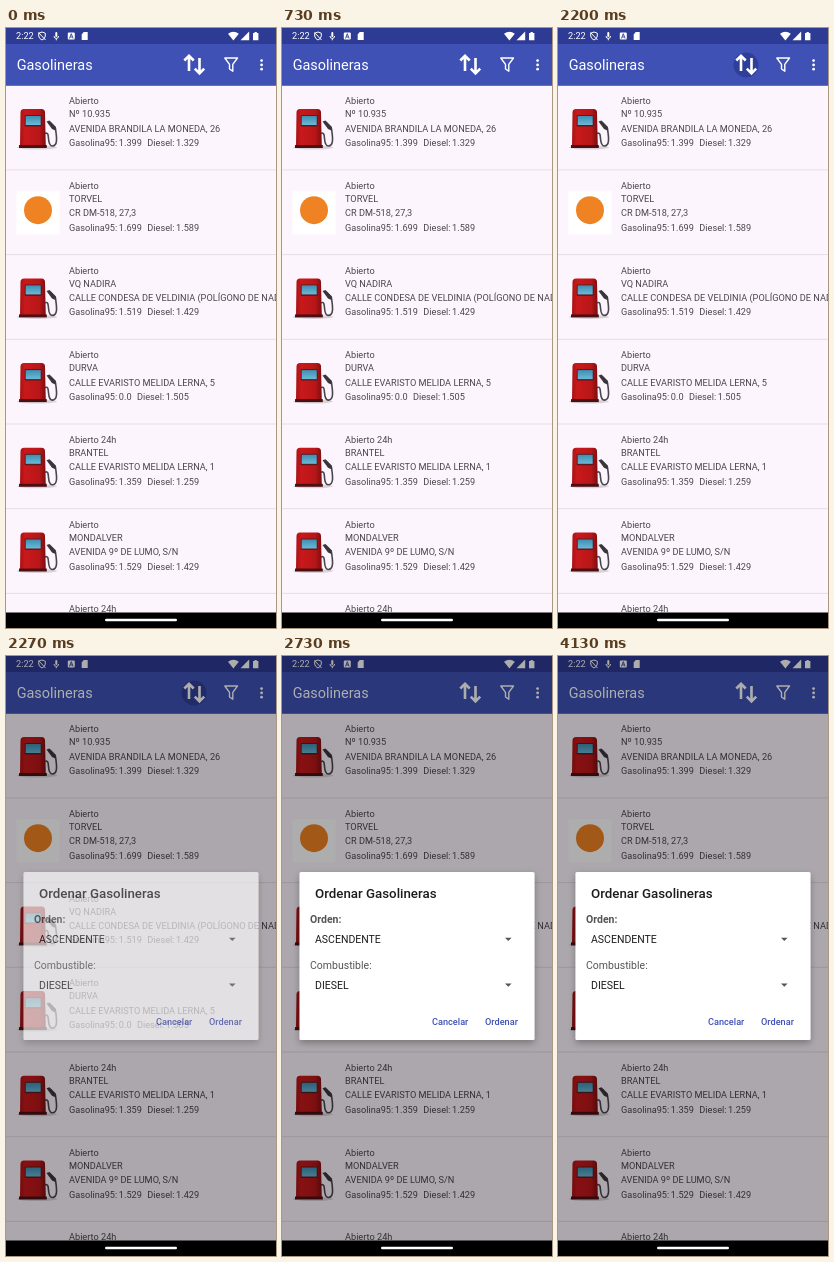
Recreate the animation shown at these times as an HTML page. Size 270 by 600 pixels, loop 4.19 s.

```html
<!DOCTYPE html>
<html lang="es">
<head>
<meta charset="utf-8">
<style>
html, body { margin: 0; width: 100%; height: 100%; overflow: hidden; background: #fdf5fd; }
svg { display: block; width: 100vw; height: 100vh; font: 9.19px Roboto, sans-serif; }
.row text { fill: #4a464b; }
.medium { font-weight: 500; }
.field { font-size: 10.5px; fill: #1d1b1e; }
.label { font-size: 10.5px; fill: #555; }
</style>
</head>
<body>
<svg viewBox="0 0 270 600">
  <defs>
    <linearGradient id="red">
      <stop offset="0" stop-color="#a81214"/>
      <stop offset=".2" stop-color="#c8191b"/>
      <stop offset=".75" stop-color="#b81618"/>
      <stop offset="1" stop-color="#7c0d10"/>
    </linearGradient>
    <linearGradient id="glass" x2="0" y2="1">
      <stop offset="0" stop-color="#3f8fb4"/>
      <stop offset="1" stop-color="#69b9d6"/>
    </linearGradient>
    <filter id="shadow" x="-10%" y="-10%" width="120%" height="125%">
      <feDropShadow dx="0" dy="3" stdDeviation="3.5" flood-opacity=".3"/>
    </filter>
    <g id="pump">
      <ellipse cx="31" cy="62" rx="20" ry="2" fill="#000" opacity=".14"/>
      <path d="M39 48C45 45 40 60 46 60.5C53 61 50 48 49.5 43L44 37" fill="none" stroke="#4a474c" stroke-width="1.6"/>
      <path d="M40.5 36L43.5 35L50 41.5L49.3 45L46 43.5Z" fill="#39363a"/>
      <path d="M14 60.5L14.5 27Q14.5 23.5 18 23.5H35.5Q39 23.5 39 27L39.8 60.5Z" fill="url(#red)"/>
      <rect x="18.7" y="29.5" width="17" height="11.5" rx="1" fill="#5c1a20"/>
      <rect x="19.7" y="30.5" width="15" height="9" fill="url(#glass)"/>
      <path d="M13 59.5H40.8V62.5H13Z" fill="#4b1014"/>
    </g>
  </defs>

  <rect width="270" height="600" fill="#fdf5fd"/>
  <g id="list"></g>

  <rect width="270" height="57.8" fill="#3f51b5"/>
  <rect width="270" height="16" fill="#2d3b95"/>
  <g fill="#fff">
    <text x="10" y="11.3">2:22</text>
    <g fill="none" stroke="#fff" stroke-width="1">
      <path d="M36 4L39.3 5.2V8Q39 10.7 36 12Q33 10.7 32.7 8V5.2ZM32.5 4.5L39.5 12"/>
      <path d="M48 8Q48 10.4 50.3 10.4T52.6 8M50.3 10.4V12.3"/>
    </g>
    <rect x="49.3" y="4" width="2" height="5" rx="1"/>
    <rect x="61.8" y="4.5" width="7" height="7" rx="1"/>
    <path d="M63.5 10.5L65.3 5.7L67.1 10.5M64.3 9H66.3" fill="none" stroke="#2d3b95" stroke-width=".9"/>
    <path d="M75.7 6.5L77.7 4H81.7V12H75.7Z"/>
    <path d="M222 5.8Q227.4 1.8 232.8 5.8L227.4 12.5Z"/>
    <path d="M234.5 12.3L243.2 3.6V12.3Z"/>
    <path d="M247 5H248.6V4H250.8V5H252.4V12.3H247Z"/>
    <text x="10.7" y="42.4" font-size="14.44">Gasolineras</text>
  </g>
  <circle id="ripple" cx="188" cy="37" r="12.5" fill="#101a58"/>
  <g fill="none" stroke="#fff" stroke-width="2.6">
    <path d="M183 43V28M178.3 32.5L183 27.8L187.7 32.5"/>
    <path d="M193.5 30V45M188.8 40.7L193.5 45.4L198.2 40.7"/>
    <path d="M218.8 30H231.5L226.8 36.3V43.2L223.5 41V36.3Z" stroke-width="1.4" stroke-linejoin="round"/>
  </g>
  <g fill="#fff">
    <circle cx="255.6" cy="32.6" r="1.4"/>
    <circle cx="255.6" cy="36.9" r="1.4"/>
    <circle cx="255.6" cy="41.2" r="1.4"/>
  </g>

  <rect id="dim" width="270" height="600"/>

  <g id="dialog">
    <rect x="17.5" y="216" width="235" height="168" rx="1.5" fill="#fff" filter="url(#shadow)"/>
    <text x="33" y="241.6" font-size="13.3" class="medium" fill="#1d1b1e">Ordenar Gasolineras</text>
    <text x="28" y="267" class="label" font-weight="700">Orden:</text>
    <text x="33" y="287.2" class="field">ASCENDENTE</text>
    <text x="28" y="312.8" class="label">Combustible:</text>
    <text x="33" y="332.8" class="field">DIESEL</text>
    <path d="M223 281.7H229.6L226.3 285ZM223 327.4H229.6L226.3 330.7Z" fill="#555"/>
    <g class="medium" fill="#3f51b5">
      <text x="150" y="369.4">Cancelar</text>
      <text x="203" y="369.4">Ordenar</text>
    </g>
  </g>

  <rect y="584.5" width="270" height="15.5"/>
  <rect x="99" y="590.8" width="72" height="2.4" rx="1.2" fill="#fff"/>
</svg>
<script>
const LOOP = 4190, ROW = 84.7, TOP = 57.5;
const $ = id => document.getElementById(id);

// hours, station, address, petrol price, diesel price
const stations = [
  ["Abierto", "Nº 10.935", "AVENIDA BRANDILA LA MONEDA, 26", "1.399", "1.329"],
  ["Abierto", "TORVEL", "CR DM-518, 27,3", "1.699", "1.589"],
  ["Abierto", "VQ NADIRA", "CALLE CONDESA DE VELDINIA (POLÍGONO DE NADIRA)", "1.519", "1.429"],
  ["Abierto", "DURVA", "CALLE EVARISTO MELIDA LERNA, 5", "0.0", "1.505"],
  ["Abierto 24h", "BRANTEL", "CALLE EVARISTO MELIDA LERNA, 1", "1.359", "1.259"],
  ["Abierto", "MONDALVER", "AVENIDA 9º DE LUMO, S/N", "1.529", "1.429"],
  ["Abierto 24h", "", "", "", ""]
];

const badge = `<rect x="10.5" y="21" width="43" height="43" fill="#fff"/>
  <circle cx="32" cy="40" r="14" fill="#ef8222"/>`;
const pump = `<use href="#pump"/>`;

$("list").innerHTML = stations.map(([hours, name, address, petrol, diesel], i) => `
  <g class="row" transform="translate(0 ${TOP + i * ROW})">
    ${i ? `<path d="M0 -.3H270" stroke="#e0d9e0" stroke-width=".8"/>` : ""}
    ${name && (i === 1 ? badge : pump)}
    <text x="63" y="18.7">${hours}</text>
    <text x="63" y="31.7">${name}</text>
    <text x="63" y="46">${address}</text>
    ${name && `<text x="63" y="60.6">Gasolina95:<tspan dx="1.6">${petrol}</tspan><tspan dx="5.4">Diesel:</tspan><tspan dx="1.6">${diesel}</tspan></text>`}
  </g>`).join("");

// value of the last step reached
const step = (t, ...steps) => steps.reduce((v, [at, value]) => t >= at ? value : v, 0);

function draw() {
  const t = performance.now() % LOOP;
  $("ripple").style.opacity = step(t, [2130, .2], [2200, .32], [2330, .24], [2400, .12], [2470, 0]);
  $("dim").style.opacity = step(t, [2270, .32]);
  $("dialog").style.opacity = step(t, [2270, .65], [2330, 1]);
  requestAnimationFrame(draw);
}
draw();
</script>
</body>
</html>
```
